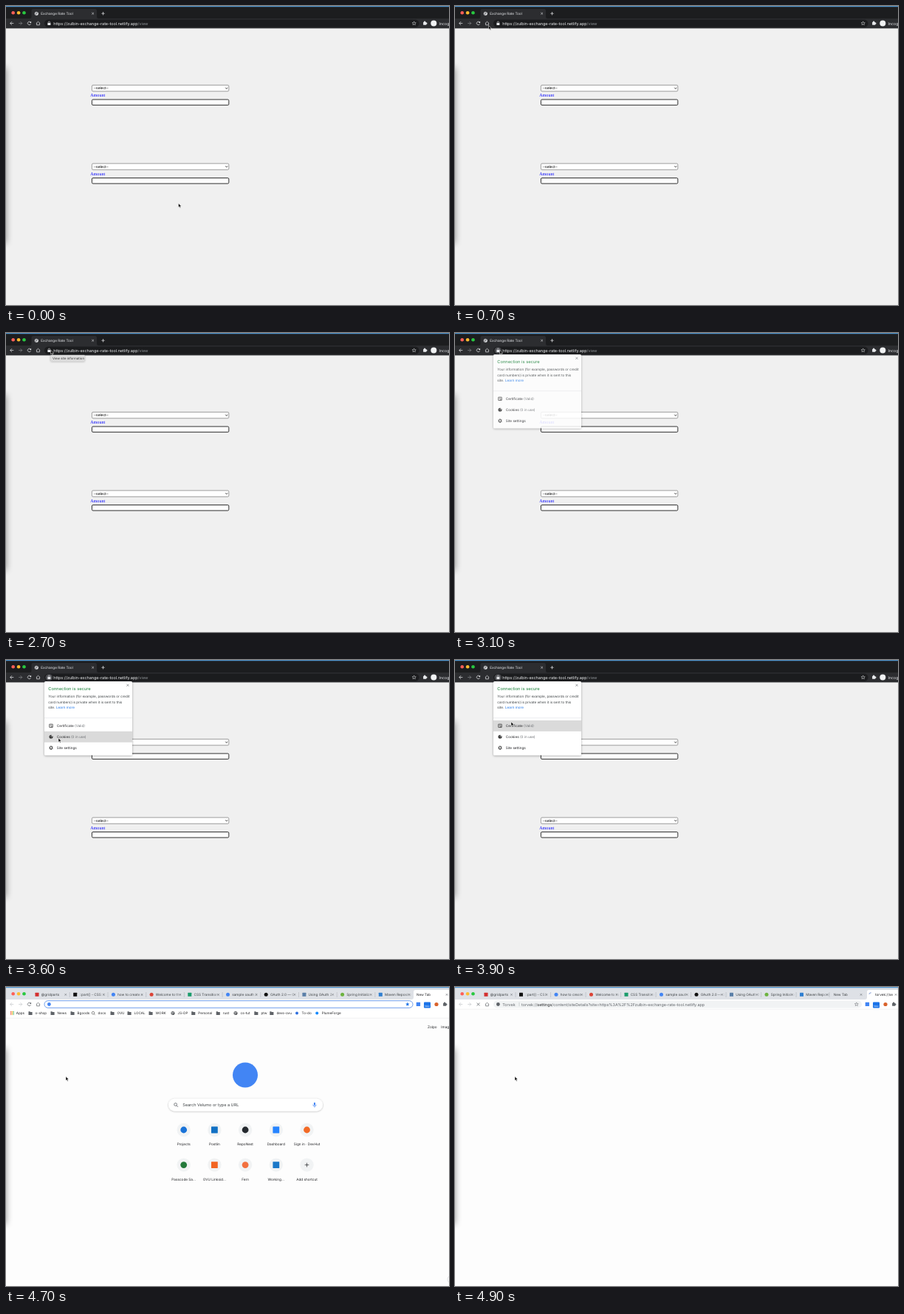
An HTML page for the animation above (5 s loop, 600 by 406 pixels).

```html
<!DOCTYPE html>
<html lang="en">
<head>
<meta charset="utf-8">
<title>Site settings walkthrough</title>
<style>
  html, body { margin: 0; width: 100%; height: 100%; overflow: hidden; background: #f0f0f0; }
  svg { display: block; }
  #stage { width: 100vw; height: 100vh; }
  text { font-family: Inter, Roboto, sans-serif; text-rendering: geometricPrecision; white-space: pre; }
  .serif { font-family: "Liberation Serif", "Times New Roman", serif; }
  .arial { font-family: "Liberation Sans", Arial, sans-serif; }
</style>
</head>
<body>
<svg id="stage" viewBox="0 0 600 406" xmlns="http://www.w3.org/2000/svg">
  <defs>
    <linearGradient id="fade">
      <stop offset="0" stop-color="#dee1e6" stop-opacity="0"/>
      <stop offset="1" stop-color="#dee1e6"/>
    </linearGradient>
    <filter id="blur" x="-200%" y="-20%" width="500%" height="140%"><feGaussianBlur stdDeviation="5"/></filter>
    <filter id="soft" x="-20%" y="-20%" width="140%" height="150%">
      <feDropShadow dx="0" dy="1" stdDeviation="1.5" flood-opacity=".35"/>
    </filter>
    <filter id="lift" x="-5%" y="-30%" width="110%" height="180%">
      <feDropShadow dx="0" dy=".5" stdDeviation=".9" flood-opacity=".3"/>
    </filter>
  </defs>
  <g id="dark"></g>
  <g id="tip"></g>
  <g id="popup"></g>
  <g id="newTab"></g>
  <g id="settings"></g>
  <rect x="-20" y="84" width="20" height="238" fill="#000" opacity=".42" filter="url(#blur)"/>
  <path id="pointer" d="M0 0V5.4L1.3 4.3L2.2 6.3L3.2 5.9L2.3 3.9H4Z" fill="#000" stroke="#fff" stroke-width=".5" stroke-linejoin="round"/>
</svg>
<script>
const $ = id => document.getElementById(id);
const text = (x, y, s, size = 4.6, fill = '#202124', more = '') =>
  `<text x="${x}" y="${y}" font-size="${size}" fill="${fill}" ${more}>${s}</text>`;
const rect = (x, y, w, h, fill, r = 0, more = '') =>
  `<rect x="${x}" y="${y}" width="${w}" height="${h}" rx="${r}" fill="${fill}" ${more}/>`;
const dot = (x, y, r, fill, more = '') =>
  `<circle cx="${x}" cy="${y}" r="${r}" fill="${fill}" ${more}/>`;
const line = (d, color, w = .7, more = '') =>
  `<path d="${d}" fill="none" stroke="${color}" stroke-width="${w}" ${more}/>`;
const fillPath = (d, color) => `<path d="${d}" fill="${color}"/>`;
const cross = (x, y, color, r = 1.4, w = .6) =>
  line(`M${x - r} ${y - r}l${2 * r} ${2 * r}m0 ${-2 * r}l${-2 * r} ${2 * r}`, color, w);
const plus = (x, y, color, r = 2.2) => line(`M${x - r} ${y}h${2 * r}M${x} ${y - r}v${2 * r}`, color);
const mark = (x, y, r, color, round) =>
  round ? dot(x, y, r, color) : rect(x - r, y - r, 2 * r, 2 * r, color, .4);

const lights = () => ['#ff5f57', '#febc2e', '#28c840'].map((c, i) => dot(9.7 + i * 7.4, 9.3, 2.3, c)).join('');
const home = color => line('M40.8 23.7L43.5 21.2L46.2 23.7M41.6 23.2V25.8H45.4V23.2', color);
const reload = color =>
  line('M33.4 22.2A2.2 2.2 0 1 0 33.6 24.2', color) + fillPath('M34.1 20.8V23H31.9Z', color);
const arrow = (x, dir, color) =>
  line(`M${x - 2.3 * dir} 23.5H${x + 2.3 * dir}M${x} 21.2L${x + 2.3 * dir} 23.5L${x} 25.8`, color);
const puzzle = (x, color) =>
  rect(x - 2.2, 21.8, 4.2, 4, color, .6) + dot(x - .2, 21.7, 1.1, color) + dot(x + 2.1, 23.7, 1.1, color);

function starPath(x, y, r) {
  const pts = Array.from({ length: 10 }, (_, i) => {
    const a = -Math.PI / 2 + i * Math.PI / 5, q = i % 2 ? r * .45 : r;
    return `${(x + q * Math.cos(a)).toFixed(2)} ${(y + q * Math.sin(a)).toFixed(2)}`;
  });
  return `M${pts.join('L')}Z`;
}
const globe = (x, y, color, gap) => dot(x, y, 2.5, color) +
  line(`M${x - 1.8} ${y - 1}h1.6v1.2h1.4M${x - .8} ${y + 1.9}v-1.2h-1M${x + .6} ${y - 2}v.8h1.1`, gap, .6);

function formBlock(y) {
  return rect(116.4, y + .4, 185.4, 8.4, '#fff', 1.6, 'stroke="#777" stroke-width=".7"') +
    text(118.7, y + 6.3, '--select--', 5.1, '#000', 'class="arial"') +
    line(`M297.2 ${y + 3.8}l1.5 1.7l1.5 -1.7`, '#222', .8) +
    text(114.2, y + 16.4, 'Amount', 6.1, '#00f', 'class="serif"') +
    rect(116.4, y + 20, 185.4, 7.6, '#fff', 1.5, 'stroke="#1a1a1a" stroke-width=".9"');
}

const topEdge = rect(0, 0, 600, 1.2, '#5297cf');
const pale = '#e8eaed';

$('dark').innerHTML =
  rect(0, 0, 600, 406, '#f0f0f0') + rect(0, 0, 600, 18, '#1c1d1f') + rect(0, 17, 600, 13.4, '#2c2d30') +
  topEdge + lights() +
  fillPath('M32 17Q34.5 17 34.5 14.5V6.5Q34.5 4 37 4H120.5Q123 4 123 6.5V14.5Q123 17 125.5 17Z', '#2c2d30') +
  globe(41.3, 10.2, pale, '#2c2d30') + text(47.2, 12, 'Exchange Rate Tool', 4.7, pale) +
  cross(117.6, 10.2, pale) + plus(131.5, 10.2, pale) +
  arrow(8, -1, pale) + arrow(19.5, 1, '#85878a') + reload(pale) + home(pale) +
  rect(52, 18.4, 507.5, 10.4, '#1b1c1e', 5.2) +
  '<g id="lockGlow">' + rect(53.5, 19.2, 9.5, 8.8, '#4b4c50', 4.4) + '</g>' +
  rect(56.4, 23, 4, 3.1, pale, .5) + line('M57.2 23V22.2A1.2 1.2 0 0 1 59.6 22.2V23', pale, .6) +
  text(64.2, 25.5, 'https://zulbin-exchange-rate-tool.netlify.app<tspan fill="#8f9296">/view</tspan>', 5.45, '#f1f3f4') +
  line(starPath(552.7, 23.6, 2.7), pale, .5) + puzzle(567.3, pale) + dot(579.3, 23.6, 4, '#f1f3f4') +
  text(586.6, 25.5, 'Incognito', 5.2, pale) +
  formBlock(107) + formBlock(213.5);

$('tip').innerHTML =
  rect(60.3, 30, 46.4, 8.2, '#dedede', 1, 'stroke="#c4c4c4" stroke-width=".3" filter="url(#lift)"') +
  text(62.9, 35.7, 'View site information', 4.35, '#333');

const rowText = (y, name, note = '') =>
  text(68.8, y, `${name} <tspan fill="#6b6e72">${note}</tspan>`, 4.65);
function gear(x, y) {
  let teeth = '';
  for (let i = 0; i < 6; i++) {
    const a = i * Math.PI / 3 + .5, c = Math.cos(a), s = Math.sin(a);
    teeth += `M${x + 1.6 * c} ${y + 1.6 * s}L${x + 2.7 * c} ${y + 2.7 * s}`;
  }
  return line(teeth, '#333', 1.2) + dot(x, y, 1.6, 'none', 'stroke="#333" stroke-width=".8"');
}
$('popup').innerHTML =
  rect(52, 29, 119, 100.3, '#fff', 1.6, 'filter="url(#soft)"') +
  '<rect id="hover" x="52" width="119" height="14.9" fill="#dadada"/>' +
  cross(164.9, 34.3, '#5f6368', 1.5) +
  text(57.3, 41, 'Connection is secure', 5.75, '#188038') +
  ['Your information (for example, passwords or credit', 'card numbers) is private when it is sent to this', 'site.']
    .map((s, i) => text(57.3, 51 + i * 7.6, s, 4.6, '#3c4043')).join('') +
  text(68, 66.2, 'Learn more', 4.6, '#1a73e8') +
  line('M52 78.7H171', '#dadce0', .5) +
  rect(58.7, 87.1, 4.6, 4.4, 'none', .3, 'stroke="#333" stroke-width=".7"') +
  line('M59.6 88.4h2.8M59.6 90h1.2', '#333', .5) + dot(61.9, 90.2, .7, '#333') +
  dot(61, 104.3, 2.5, '#333') + dot(60.2, 103.5, .45, '#ddd') + dot(61.3, 105.4, .45, '#ddd') +
  dot(62.3, 103, .9, '#ddd') + gear(61, 119.2) +
  rowText(91, 'Certificate', '(Valid)') + rowText(105.9, 'Cookies', '(0 in use)') + rowText(120.9, 'Site settings');

const tabs = [
  ['@gridparts', '#d32f2f'], ['::part() - CSS: Ca', '#111'], ['how to create a', '#4285f4', 1],
  ['Welcome to the', '#db4437', 1], ['CSS Transitions', '#1a9c6b'], ['sample oauth 2', '#4285f4', 1],
  ['OAuth 2.0 — O', '#111', 1], ['Using OAuth 2', '#5a7fa8'], ['Spring Initializr', '#6db33f', 1],
  ['Maven Repository', '#2f7fd1']
];
const grey = '#5f6368';

function lightFrame(pitch, activeX) {
  const room = pitch - 16;
  return rect(0, 0, 600, 406, '#fdfdfd') + rect(0, 0, 600, 17, '#dee1e6') + topEdge + lights() +
    tabs.map(([name, color, round], i) => {
      const x = 42 + i * pitch;
      return mark(x, 10.3, 2.5, color, round) +
        `<svg x="${x + 5.7}" y="4" width="${room}" height="12">` + text(0, 8, name, 4.7, '#3c4043') +
        rect(room - 9, 0, 9, 12, 'url(#fade)') + '</svg>' +
        cross(x + pitch - 13, 10.4, grey, 1.2) +
        (i < 9 ? line(`M${x + pitch - 7.4} 7V14`, '#9a9da2', .4) : '');
    }).join('') +
    fillPath(`M${activeX - 3} 17Q${activeX} 17 ${activeX} 14V6.5Q${activeX} 4 ${activeX + 2.5} 4H600V17Z`, '#fff') +
    cross(597, 10.4, grey, 1.2) + rect(0, 17, 600, 13, '#fff') + home(grey);
}
const extras =
  mark(558.4, 23.4, 2.7, '#4285f4') + rect(566, 20.5, 9, 8, '#1a73e8', 1) +
  text(570.5, 27.2, 'New', 3, '#fff', 'text-anchor="middle"') +
  mark(583, 23.5, 2.6, '#d9622b', 1) + puzzle(594.3, grey);

const folder = x => fillPath(`M${x - 2.5} 33.2h1.9l.7 .7h2.5v4h-5.1Z`, '#5f6368');
const bookmarks = [
  [33, 'o-shop'], [63, 'News'], [90, 'Bgoods'], [118, 'docs', 'q'], [144, 'OVU'], [167, 'LOCAL'], [196, 'WORK'],
  [226, 'JS-DP', 'g'], [253.7, 'Personal'], [287.2, 'rust'], [311, 'cs-tut', 'g'], [338.8, 'ptw'],
  [359.8, 'devs-ovu'], [394, 'To-do', '#2f6fde'], [421.2, 'PlumeForge', '#1389fd']
];
function bookmarkIcon(x, kind) {
  if (!kind) return folder(x);
  if (kind === 'q') return dot(x, 35.2, 1.8, 'none', 'stroke="#444" stroke-width=".6"') + line(`M${x + 1.2} 36.5l1.3 1.3`, '#444');
  if (kind === 'g') return globe(x, 35.5, '#4a4d51', '#fff');
  return mark(x, 35.5, 2, kind, 1);
}
let appGrid = '';
for (let i = 0; i < 9; i++)
  appGrid += rect(6 + i % 3 * 1.8, 33 + Math.floor(i / 3) * 1.8, 1.2, 1.2, ['#ea4335', '#f9ab00', '#34a853'][i % 3]);

const shortcuts = [
  ['Projects', '#1a73d8', 1], ['Postlin', '#1170c4'], ['RepoNest', '#24292e', 1], ['Dashboard', '#2684ff'],
  ['Sign in · DevHut', '#f26a26', 1], ['Passcode Sa...', '#23793a', 1], ['OVU Linksid...', '#f26522'],
  ['Fern', '#f2703f', 1], ['Working...', '#1b78c8'], ['Add shortcut']
];
$('newTab').innerHTML =
  lightFrame(51.7, 552) + text(556, 12, 'New Tab', 4.6) +
  arrow(8, -1, '#c4c7cb') + arrow(19.5, 1, '#c4c7cb') + reload(grey) +
  rect(52, 18.7, 499, 9.6, '#fff', 4.8, 'stroke="#5e92e8" stroke-width=".9"') + mark(58.4, 23.5, 2.4, '#4285f4', 1) +
  fillPath(starPath(543.8, 23.4, 2.8), '#1a73e8') + extras +
  rect(0, 29, 600, 13, '#fff') + line('M0 42.2H600', '#e3e4e6', .5) + appGrid + text(13.8, 37.1, 'Apps') +
  bookmarks.map(([x, name, kind]) => bookmarkIcon(x, kind) + text(x + 6.6, 37.1, name)).join('') +
  text(571, 56, 'Zolpo', 4.7) + text(589.3, 56, 'Images', 4.7) +
  dot(324, 119.5, 17, '#4285f4') +
  rect(220, 151.7, 209, 16.8, '#fff', 8.4, 'filter="url(#lift)"') +
  dot(229.6, 159.5, 1.9, 'none', 'stroke="#5f6368" stroke-width=".8"') + line('M231 160.9l2 2', grey, .8) +
  text(239.2, 162, 'Search Velumo or type a URL', 5.5, '#3c4043') +
  rect(416.9, 156.7, 2.1, 4, '#4285f4', 1.05) + line('M415.7 159.7A2.25 2.25 0 0 0 420.2 159.7M418 162V163.6', '#4285f4', .7) +
  shortcuts.map(([name, color, round], i) => {
    const x = 240.7 + i % 5 * 41.7, y = i < 5 ? 194 : 241.6;
    return dot(x, y, 9.2, '#f1f3f4') + (color ? mark(x, y, 4.4, color, round) : plus(x, y, '#202124', 2.8)) +
      text(x, y + 21.2, name, 4.7, '#202124', 'text-anchor="middle"');
  }).join('') +
  dot(603, 397, 5, '#fff', 'stroke="#cfd1d4" stroke-width=".6"');

$('settings').innerHTML =
  lightFrame(47.5, 558) + text(512.8, 12, 'New Tab', 4.6, '#3c4043') + cross(550, 10.4, grey, 1.2) +
  line('M507 7V14', '#9a9da2', .4) +
  '<path id="spinner" d="M563.3 7.8A2.5 2.5 0 0 1 565.8 10.3" fill="none" stroke="#5b7fc4" stroke-width=".7"/>' +
  '<svg x="569" y="4" width="24" height="12">' + text(0, 8, 'torvek://settings', 4.7) + '</svg>' +
  arrow(8, -1, '#c4c7cb') + arrow(19.5, 1, '#c4c7cb') + cross(31.5, 23.5, grey, 1.9, .8) +
  rect(52, 18.4, 499, 10.2, '#f1f3f4', 5.1) + mark(58.4, 23.5, 2.4, grey, 1) +
  text(64.2, 25.5, 'Torvek', 5.4, grey) + line('M87 20.8V26.2', '#aeb1b5', .5) +
  text(90, 25.5, 'torvek://<tspan fill="#202124">settings</tspan>/content/siteDetails?site=https%3A%2F%2Fzulbin-exchange-rate-tool.netlify.app', 5.35, grey) +
  line(starPath(543.8, 23.5, 2.6), grey, .5) + extras + line('M0 30.2H600', '#e3e4e6', .5);

// Pointer positions: time, x, y
const moves = [
  [0, 233.5, 268], [200, 172, 190], [300, 119.5, 122.5],
  [500, 98, 94], [600, 67, 53], [700, 45.5, 26.5],
  [1100, 28, 18], [1200, 9.5, 10.5], [1300, 33, 17], [1400, 60.2, 23],
  [1700, 60.6, 23.3], [3500, 66, 76], [3600, 71, 106],
  [3900, 76, 84], [4000, 83, 58], [4100, 86, 39.5], [4200, 86, 68],
  [4300, 85, 102], [4400, 85, 124], [4500, 81, 121.6]
];
const fades = [[0, 0], [2900, .3], [3000, .6], [3100, .85], [3200, 1]];
const latest = (steps, t) => steps.filter(s => s[0] <= t).pop();
const show = (id, on) => $(id).style.display = on ? '' : 'none';

function draw(now) {
  const t = now % 5000;
  const [, x, y] = latest(moves, t);
  const row = Math.floor((y - 82) / 14.9);
  $('pointer').setAttribute('transform', `translate(${x} ${y})`);
  $('popup').style.opacity = latest(fades, t)[1];
  show('dark', t < 4700);
  show('tip', t >= 2700 && t < 2900);
  show('popup', t >= 2900 && t < 4700);
  show('lockGlow', t >= 2800 && t < 4700);
  show('hover', row >= 0 && row < 3);
  $('hover').setAttribute('y', 82 + row * 14.9);
  show('newTab', t >= 4700 && t < 4800);
  show('settings', t >= 4800);
  $('spinner').setAttribute('transform', `rotate(${t < 4900 ? -170 : -80} 563.3 10.3)`);
}
const start = performance.now();
function tick() {
  draw(performance.now() - start);
  requestAnimationFrame(tick);
}
tick();
</script>
</body>
</html>
```
